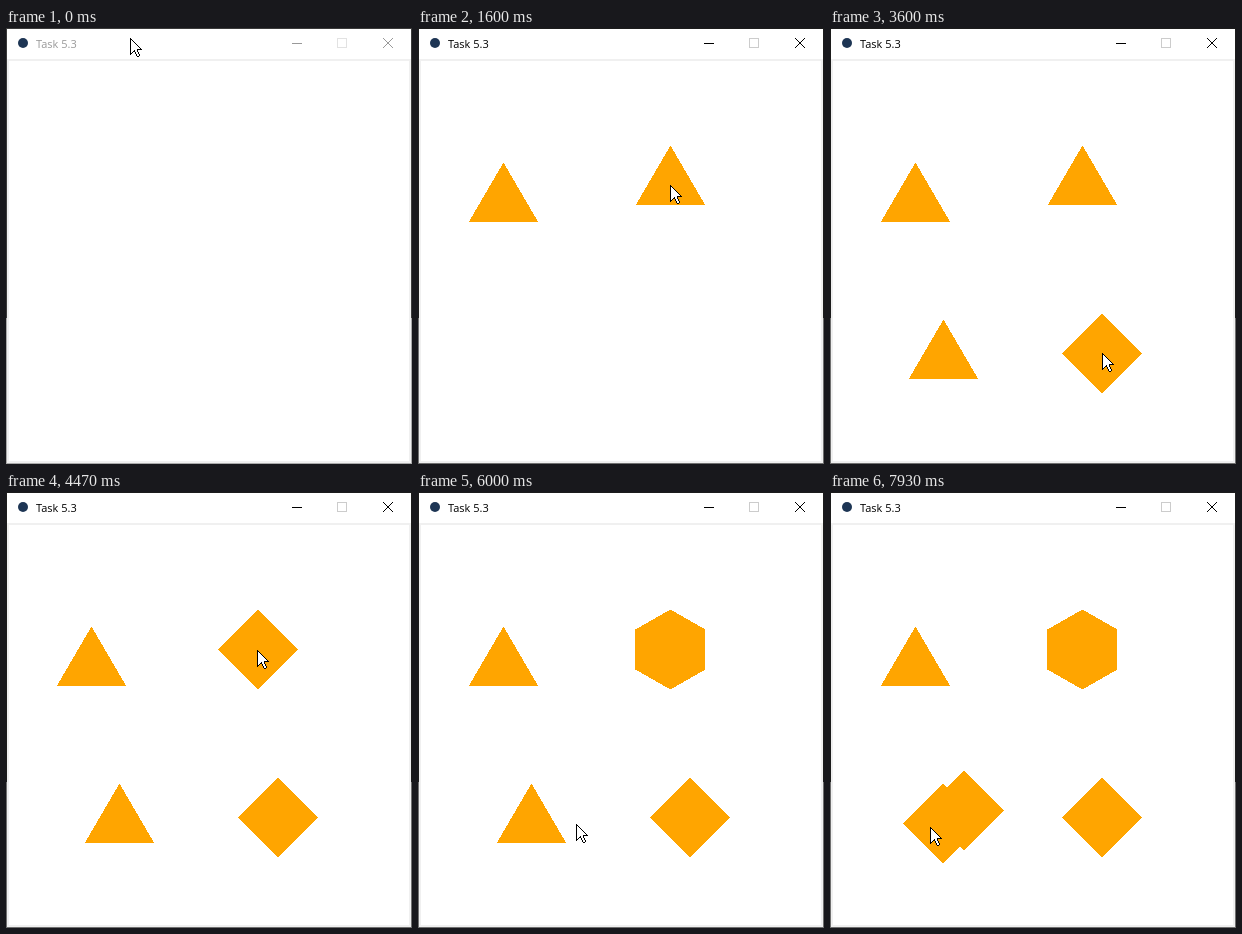
An HTML page with a canvas that plays this animation: 406x436 px, repeating every 8 s.

```html
<!DOCTYPE html>
<html lang="en">
<head>
<meta charset="utf-8">
<title>Task 5.3</title>
<style>
  html, body { margin: 0; width: 406px; height: 436px; overflow: hidden; background: #fff; }
  canvas { display: block; }
</style>
</head>
<body>
<canvas id="stage" width="406" height="436"></canvas>
<script>
const ctx = document.getElementById('stage').getContext('2d');
const LOOP = 8000, FPS = 15, RADIUS = 40;
const FOCUS = 11; // tick at which the window becomes active

// Each click adds a side: the first one makes a triangle.
const shapes = [
  { x: 85, y: 174, clicks: [11] },
  { x: 252, y: 157, clicks: [24, 67, 72, 78] },
  { x: 113, y: 331, clicks: [35, 119] },
  { x: 272, y: 325, clicks: [44, 54] },
  { x: 134, y: 318, clicks: [100, 110] }
];

// Pointer moves: start tick, end tick, target x, y
const home = [124, 10];
const moves = [
  [0, 9, 85, 174],
  [14, 15, 87, 174],
  [15, 22, 252, 157],
  [27, 34, 113, 331],
  [38, 43, 272, 325],
  [61, 65, 251, 158],
  [83, 90, 158, 332],
  [90, 96, 141, 321],
  [96, 99, 134, 318],
  [114, 116, 100, 335]
];

const arrow = [[0, 0], [0, 16], [4, 12], [6, 17], [7, 18], [8, 18], [9, 17], [7, 12], [7, 11], [11, 11]];

function rect(x, y, w, h, color) {
  ctx.fillStyle = color;
  ctx.fillRect(x, y, w, h);
}

// Scanline fill, so that edges stay hard
function fillPoly(pts, color) {
  const ys = pts.map(p => p[1]);
  for (let y = Math.min(...ys); y < Math.max(...ys); y++) {
    const xs = [];
    pts.forEach(([x1, y1], i) => {
      const [x2, y2] = pts[(i + 1) % pts.length];
      if ((y1 <= y) !== (y2 <= y)) xs.push(x1 + (y - y1) * (x2 - x1) / (y2 - y1));
    });
    xs.sort((a, b) => a - b);
    for (let i = 0; i + 1 < xs.length; i += 2) {
      const left = Math.ceil(xs[i]);
      rect(left, y, Math.ceil(xs[i + 1]) - left, 1, color);
    }
  }
}

function pixelLine([x1, y1], [x2, y2], color) {
  const n = Math.max(Math.abs(x2 - x1), Math.abs(y2 - y1));
  for (let i = 0; i <= n; i++) {
    rect(Math.round(x1 + (x2 - x1) * i / n), Math.round(y1 + (y2 - y1) * i / n), 1, 1, color);
  }
}

function polygon(x, y, sides) {
  return Array.from({ length: sides }, (_, i) => {
    const a = 2 * Math.PI * i / sides;
    return [Math.round(x + RADIUS * Math.sin(a)), Math.round(y - RADIUS * Math.cos(a))];
  });
}

function pointerAt(tick) {
  let [x, y] = home;
  for (const [start, end, tx, ty] of moves) {
    if (tick <= start) break;
    const u = Math.min(1, (tick - start) / (end - start));
    const e = u * u * (3 - 2 * u);
    x += (tx - x) * e;
    y += (ty - y) * e;
  }
  return [Math.round(x), Math.round(y)];
}

function drawWindow(active) {
  rect(0, 0, 406, 290, active ? '#1c1c1c' : '#3b3b3b');
  rect(0, 290, 406, 146, active ? '#707070' : '#aaaaaa');
  rect(1, 1, 404, 30, '#fff');
  rect(1, 31, 404, 404, '#f0f0f0');
  rect(3, 33, 400, 400, '#fff');

  ctx.fillStyle = '#1d3554';
  ctx.beginPath();
  ctx.arc(17, 15, 5, 0, 7);
  ctx.fill();

  const ink = active ? '#000' : '#999';
  ctx.fillStyle = ink;
  ctx.font = '11px "Open Sans", "Noto Sans", sans-serif';
  ctx.fillText('Task 5.3', 30, 20);

  rect(286, 15, 10, 1, ink);
  ctx.lineWidth = 1;
  ctx.strokeStyle = active ? '#ccc' : '#e2e2e2';
  ctx.strokeRect(331.5, 10.5, 9, 9);
  ctx.strokeStyle = ink;
  ctx.beginPath();
  ctx.moveTo(377, 10);
  ctx.lineTo(387, 20);
  ctx.moveTo(387, 10);
  ctx.lineTo(377, 20);
  ctx.stroke();
}

function drawPointer(x, y) {
  const pts = arrow.map(([dx, dy]) => [x + dx, y + dy]);
  fillPoly(pts, '#fff');
  pts.forEach((p, i) => pixelLine(p, pts[(i + 1) % pts.length], '#000'));
}

// Ticks start on whole hundredths of a second
const tickStart = k => Math.round(k * 100 / FPS) * 10;

function tickAt(t) {
  const k = Math.floor(t * FPS / 1000);
  if (tickStart(k + 1) <= t) return k + 1;
  return tickStart(k) > t ? k - 1 : k;
}

function draw(t) {
  const tick = tickAt(t);
  drawWindow(tick >= FOCUS);
  for (const { x, y, clicks } of shapes) {
    const n = clicks.filter(k => k <= tick).length;
    if (n) fillPoly(polygon(x, y, n + 2), '#ffa500');
  }
  drawPointer(...pointerAt(tick));
}

const began = performance.now();
function loop() {
  draw((performance.now() - began) % LOOP);
  requestAnimationFrame(loop);
}
loop();
</script>
</body>
</html>
```
